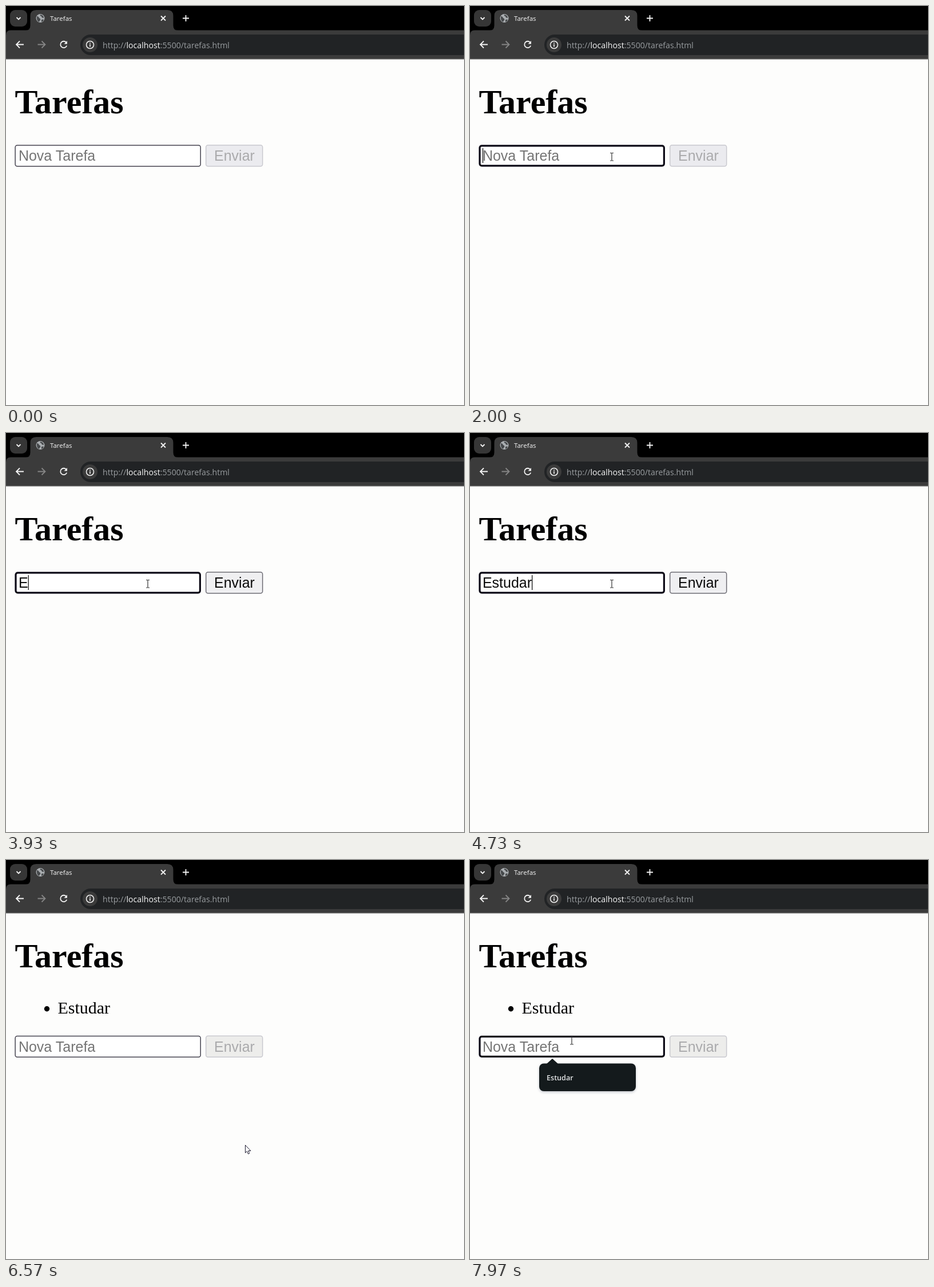
An HTML page that plays this animation: 801x699 px, repeating every 8 s.

```html
<!DOCTYPE html>
<html lang="pt">
<head>
<meta charset="utf-8">
<title>Tarefas</title>
<style>
  html, body { margin: 0; width: 100%; height: 100%; overflow: hidden; background: #fdfdfc; }
  svg { display: block; }
  .ui { font-family: "Open Sans", "Noto Sans", sans-serif; }
  .serif { font-family: "Liberation Serif", "Times New Roman", serif; }
  .form { font-family: "Liberation Sans", Arial, sans-serif; font-size: 25px; white-space: pre; }
  .icon { fill: none; stroke: #f4f4f4; stroke-width: 1.8; }
</style>
</head>
<body>
<svg width="801" height="699" viewBox="0 0 801 699">
  <rect width="801" height="699" fill="#fdfdfc"/>

  <g id="browser">
    <rect width="801" height="60" fill="#000"/>
    <path d="M0 93V51Q0 42.500 8 42.500H801V93Z" fill="#3b3b3b"/>
    <path d="M34 43Q42.500 43 42.500 34V17Q42.500 7 53 7H282Q292.500 7 292.500 17V34Q292.500 43 301 43Z" fill="#3b3b3b"/>
    <rect y="92" width="801" height="1.500" fill="#5a5a5a"/>
    <rect x="7" y="7" width="30" height="29" rx="9" fill="#363636"/>
    <path class="icon" d="M18.500 20L22 23.500L25.500 20"/>
    <circle cx="60" cy="21.500" r="7.500" fill="#a9adb0"/>
    <path d="M54 18Q57 18 58 21Q61 22 60 25Q58 26 58 28Q53 26 54 18ZM60 15Q59 18 62 18Q62 21 66 21Q66 16 60 15ZM62 24Q65 23 66 24Q65 27 62 28Z" fill="#46494b"/>
    <text class="ui" x="77" y="26" font-size="11.500" fill="#f8f8f8">Tarefas</text>
    <path class="icon" d="M271 17.500L279 25.500M279 17.500L271 25.500"/>
    <path class="icon" d="M309 21.500H320M314.500 16V27"/>
    <path class="icon" d="M31 67.500H18.500M24 61.500L18 67.500L24 73.500"/>
    <path class="icon" d="M55.500 67.500H68M62.500 61.500L68.500 67.500L62.500 73.500" style="stroke:#858585"/>
    <path class="icon" d="M105.500 64A5.700 5.700 0 1 0 106.300 69.500"/>
    <path d="M107 61V66.500H101.500Z" fill="#f4f4f4"/>
    <path d="M801 50H148A18 18 0 0 0 148 86H801Z" fill="#212325"/>
    <circle cx="147" cy="68" r="13" fill="#3b3b3b"/>
    <circle class="icon" cx="147" cy="68" r="6.500" style="stroke-width:1.500"/>
    <path class="icon" d="M147 67V71.500M147 64.300V65.900" style="stroke-width:1.600"/>
    <text class="ui" x="169" y="73.500" font-size="14.150" fill="#999da0">http://<tspan fill="#f8f8f8">localhost</tspan>:5500/tarefas.html</text>
  </g>

  <text class="serif" x="15.600" y="187.700" font-size="60" font-weight="700">Tarefas</text>
  <g id="item">
    <circle cx="71.500" cy="260.800" r="4.700"/>
    <text class="serif" x="90.400" y="268.800" font-size="30">Estudar</text>
  </g>

  <g id="form" class="form">
    <rect id="field" fill="#fff"/>
    <text id="value" x="21.900" y="271"></text>
    <rect id="caret" y="249" width="1.200" height="26"/>
    <rect id="button" x="349.700" y="243.700" width="99" height="37" rx="3.500" stroke-width="1.500"/>
    <text id="label" x="364" y="271">Enviar</text>
  </g>

  <g id="popup">
    <rect x="121" y="358" width="169" height="49" rx="8" fill="#45506a" opacity=".3" style="filter:blur(2px)"/>
    <path d="M134 357L144 348L154 357Z" fill="#141a1c"/>
    <rect x="121" y="356.500" width="169" height="48.500" rx="8" fill="#141a1c"/>
    <text class="ui" x="134" y="385.500" font-size="12.600" font-weight="600" fill="#e4e6e7">Estudar</text>
  </g>

  <path id="arrow" d="M.5 .5V14L3.500 11.200L5.600 16L7.800 15L5.800 10.500H10Z" fill="#fff" stroke="#1d1b30" stroke-width="1"/>
  <path id="beam" d="M-3-6.500H-1L0-6L1-6.500H3M0-6V6.500M-3 7H-1L0 6.500L1 7H3" fill="none" stroke="#333" stroke-width="1.200"/>
</svg>
<script>
const LOOP = 8000;
const SUBMIT = 6150;
const WORD = "Estudar";
const KEYS = [3850, 4020, 4140, 4270, 4400, 4520, 4640];
const FOCUS = [1960, 7300];

// Pointer stops: time, x, y
const STOPS = [
  [600, 797, 190], [850, 775, 262], [1230, 707, 408], [1660, 432, 322],
  [1900, 248, 264], [5300, 248, 264], [5600, 267, 264], [5750, 267, 264],
  [6050, 395, 262], [6200, 395, 262], [6570, 418, 499], [6680, 420, 515],
  [6850, 422, 549], [7250, 178, 316]
];

const $ = id => document.getElementById(id);
const show = (id, on) => $(id).setAttribute("visibility", on ? "visible" : "hidden");
const set = (id, attrs) => {
  for (const k in attrs) $(id).setAttribute(k, attrs[k]);
};

function pointerAt(t) {
  const i = STOPS.findIndex(s => s[0] > t);
  if (i < 0) return STOPS[STOPS.length - 1].slice(1);
  if (i === 0) return null;
  const [t0, x0, y0] = STOPS[i - 1], [t1, x1, y1] = STOPS[i];
  const p = (t - t0) / (t1 - t0), e = p * p * (3 - 2 * p);
  return [x0 + (x1 - x0) * e, y0 + (y1 - y0) * e];
}

function drawPointer(pos, dy) {
  const inside = (x, w) => pos && pos[0] >= x && pos[0] <= x + w && pos[1] >= 243 + dy && pos[1] <= 281 + dy;
  const overField = inside(15, 326);
  show("arrow", pos && !overField);
  show("beam", overField);
  if (pos) set(overField ? "beam" : "arrow", { transform: `translate(${pos})` });
  return inside(349, 100);
}

function drawField(t, sent) {
  const text = sent ? "" : WORD.slice(0, KEYS.filter(k => k <= t).length);
  const focused = t >= FOCUS[1] || (t >= FOCUS[0] && !sent);
  const line = focused ? 3.2 : 1.5;
  set("field", {
    x: 15.4 + line / 2, y: 243.2 + line / 2, width: 325.6 - line, height: 38.2 - line,
    rx: 3.5, "stroke-width": line, stroke: focused ? "#0d0b17" : "#45434f"
  });
  $("value").textContent = text || "Nova Tarefa";
  set("value", { fill: text ? "#0b0b0b" : "#757575" });

  const last = Math.max(...[...FOCUS, ...KEYS].filter(k => k <= t));
  show("caret", focused && (t - last) % 1000 < 500);
  set("caret", { x: 21.9 + (text ? $("value").getComputedTextLength() : 0) });
  return text;
}

function draw(t) {
  const sent = t >= SUBMIT;
  const dy = sent ? 64.5 : 0;
  set("form", { transform: `translate(0 ${dy})` });
  show("item", sent);
  show("popup", t >= 7400);

  const hover = drawPointer(pointerAt(t), dy);
  const enabled = drawField(t, sent) !== "";
  set("button", {
    fill: !enabled ? (sent ? "#ededeb" : "#ebebef") : hover ? "#e4e4e6" : "#efeff1",
    stroke: enabled ? "#6d6c74" : "#c9c9cf"
  });
  set("label", { fill: enabled ? "#0b0b0b" : "#aaaaac" });
}

function tick() {
  draw(performance.now() % LOOP);
  requestAnimationFrame(tick);
}
tick();
</script>
</body>
</html>
```
